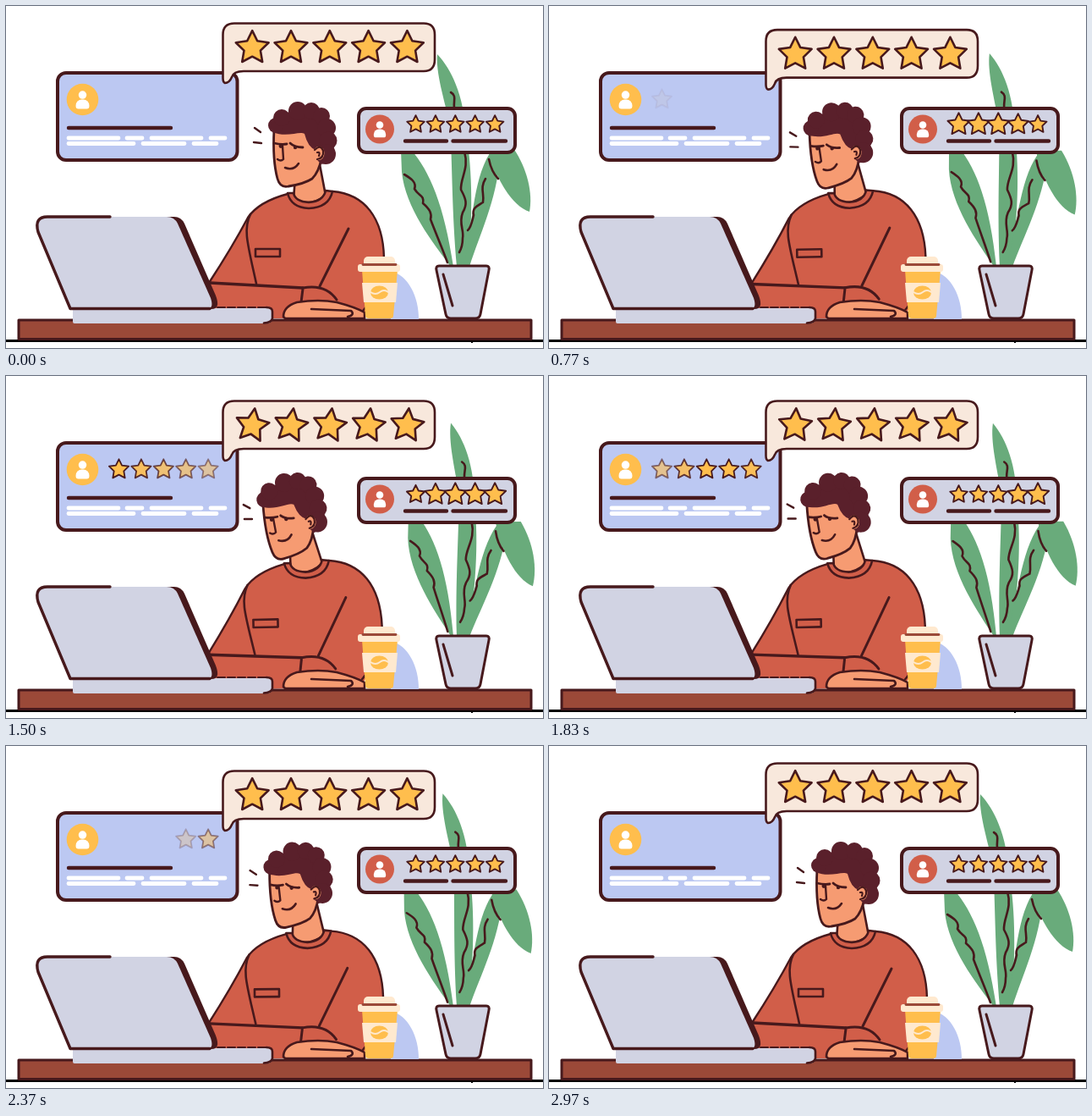
An HTML page with a canvas that plays this animation: 635x404 px, repeating every 3010 ms.

```html
<!DOCTYPE html>
<html lang="en">
<head>
<meta charset="utf-8">
<title>Customer reviews</title>
<style>
html, body { margin: 0; width: 100%; height: 100%; overflow: hidden; background: #fff; }
canvas { display: block; width: 635px; height: 404px; }
</style>
</head>
<body>
<canvas id="stage" width="635" height="404"></canvas>
<script>
const ctx = document.getElementById('stage').getContext('2d');
const LOOP = 3010;
const INK = '#47191c', RED = '#d15e49', SKIN = '#f69b72', HAIR = '#5a202b', GOLD = '#ffbe4d',
      CREAM = '#f8e8dc', MILK = '#ffe9cf', LILAC = '#bcc8f2', GREY = '#d1d3e3', GREEN = '#69ab7b', WOOD = '#9b4938';

const clamp = v => Math.max(0, Math.min(1, v));
const linear = (t, start, length) => clamp((t - start) / length);
const ease = (t, start, length) => (1 - Math.cos(Math.PI * linear(t, start, length))) / 2;

function shape(d, fill, stroke, width = 3) {
  const p = new Path2D(d);
  if (fill) { ctx.fillStyle = fill; ctx.fill(p); }
  if (stroke) { ctx.strokeStyle = stroke; ctx.lineWidth = width; ctx.stroke(p); }
}
const line = (d, width = 3, color = INK) => shape(d, null, color, width);

function box(x, y, w, h, r, fill, stroke, width) {
  const p = new Path2D();
  p.roundRect(x, y, w, h, r);
  shape(p, fill, stroke, width);
}

function dot(x, y, rx, fill, ry = rx) {
  ctx.fillStyle = fill;
  ctx.beginPath();
  ctx.ellipse(x, y, rx, ry, 0, 0, 7);
  ctx.fill();
}

function turned(x, y, angle, draw) {
  ctx.save();
  ctx.translate(x, y);
  ctx.rotate(angle);
  ctx.translate(-x, -y);
  draw();
  ctx.restore();
}

function star(x, y, r, width, angle = 0) {
  ctx.beginPath();
  for (let i = 0; i < 10; i++) {
    const a = angle - Math.PI / 2 + i * Math.PI / 5, q = i % 2 ? r * 0.5 : r;
    ctx.lineTo(x + q * Math.cos(a), y + q * Math.sin(a));
  }
  ctx.closePath();
  ctx.fillStyle = GOLD;
  ctx.fill();
  ctx.strokeStyle = INK;
  ctx.lineWidth = width;
  ctx.stroke();
}

function avatar(x, y, r, color) {
  dot(x, y, r, color);
  const k = r / 19;
  dot(x, y - 5.5 * k, 4.8 * k, '#fff');
  box(x - 8 * k, y, 16 * k, 11 * k, [7 * k, 7 * k, 3 * k, 3 * k], '#fff');
}

function plant() {
  shape('M533 308C527 240 528 190 525 140C518 110 508 78 510 57C527 75 541 105 544 150C552 195 552 255 546 308Z', GREEN);
  shape('M526 308C505 280 472 238 468 196L467 170L479 170C501 195 518 235 529 308Z', GREEN);
  shape('M541 308C552 262 551 208 572 174L584 180C580 230 560 270 548 308Z', GREEN);
  shape('M570 170C580 205 598 236 619 243C623 222 617 193 600 168Z', GREEN);
  line('M526 102C533 106 529 111 530 120', 2.6);
  line('M542 172C548 192 537 203 538 217C544 228 546 234 540 244C535 257 542 265 540 274Q540 284 536 291', 2.6);
  line('M471 199C478 203 486 208 483 216C488 225 495 223 493 233C501 240 504 245 502 252C508 268 515 284 522 303', 2.6);
  line('M567 204C560 215 566 222 564 232C556 237 551 239 553 247C551 255 550 262 546 265', 2.6);
  line('M571 181Q574 196 582 204', 2.6);
}

function pot() {
  shape('M512 307H568Q572 307 571 312L561 364Q560 369 555 369H526Q521 369 520 364L509 312Q508 307 512 307Z', GREY, INK);
  line('M517 317L528 354');
}

function head() {
  shape('M343 190L340 228Q359 238 378 224L370 182Z', SKIN, INK, 2.6);
  shape('M317 146Q315 182 321 204Q324 215 334 213Q353 210 362 204Q370 196 373 180L371 142Z', SKIN, INK, 2.8);
  shape('M315 149C333 156 347 147 353 151Q357 167 366 170L372 187Q388 184 388 170L386 142L370 124L346 120L324 130Z', HAIR);
  [[319, 141, 9], [326, 132, 10], [345, 124, 11], [361, 124, 10], [373, 130, 10],
   [379, 144, 11], [381, 159, 10.5], [378, 175, 12]].forEach(([x, y, r]) => dot(x, y, r, HAIR));
  dot(370, 174, 6.5, SKIN, 8);
  line('M365 170Q372 163 375 171Q376 180 368 181M368 173Q372 172 370 177', 2.2);
  line('M317 162Q325 164 332 163M336 162Q341 167 351 167', 2.8);
  line('M327 165L328 181Q325 184 321 181', 2.4);
  line('M330 191Q340 195 346 186', 2.6);
  dot(325, 165.5, 2.4, INK);
  dot(342, 167, 2.2, INK);
  line('M294 144L301 149M293 161L302 162', 2.4);
}

function torso() {
  shape('M333 222C307 229 294 238 286 250C269 282 255 304 240 327L248 369H420C436 345 447 325 447 298C446 250 424 222 386 219Q382 232 358 233Q340 232 338 222Z', RED);
  line('M333 222C307 229 294 238 286 250C269 282 255 304 240 327', 2.4);
  line('M386 219C424 222 446 250 447 298C447 325 436 345 422 360', 2.4);
  line('M289 246C280 264 286 282 296 328', 2.6);
  line('M405 263L371 331');
  box(295, 287, 29, 9, 0, null, INK, 2.6);
  line('M241 327L351 333', 3.4);
  line('M351 333Q378 328 391 347M351 334L349 350', 3);
}

function collar() {
  shape('M333 221Q337 238 358 239Q382 238 386 219L378 218Q375 231 358 232Q342 231 340 221Z', RED, INK, 2.6);
}

function hand() {
  shape('M328 367Q328 355 344 350Q370 346 391 350Q414 356 424 362V369H330Z', SKIN, INK, 2.6);
  line('M361 358L408 360Q413 365 404 367', 2.6);
}

function cup() {
  shape('M455 313C475 318 488 342 488 370H455Z', LILAC);
  shape('M421 312H463L458 366Q458 369 454 369H429Q425 369 425 366Z', GOLD);
  shape('M421 327H463L461 350H423Z', MILK);
  dot(441.5, 338.5, 10.5, GOLD, 8);
  line('M431 338Q437 342 442 338T452 338', 1.8, MILK);
  box(423, 296, 37, 11, [5, 5, 0, 0], MILK);
  box(416, 305, 50, 9, 3, MILK);
  line('M422 305.5H461', 2.8, WOOD);
}

function laptop() {
  box(79, 357, 236, 18, [0, 4, 6, 2], GREY);
  ctx.setLineDash([9, 3]);
  line('M250 356H310', 2);
  ctx.setLineDash([]);
  line('M308 356Q315 356 315 361V369Q314 374 305 374.5', 2.6);
  shape('M188 249H199Q207 249 211 257L248 342Q254 358 243 358H236Z', INK);
  shape('M76 357L38 267Q33 249 49 249H190Q199 249 203 257L242 345Q246 357 239 357Z', GREY);
  line('M123 249H49Q33 249 38 267L76 357.5H241', 3.4);
}

function desk() {
  ctx.fillStyle = '#000';
  ctx.fillRect(0, 394, 635, 3);
  ctx.fillRect(550, 397, 2, 1);
  box(15, 371, 606, 22.5, 0, WOOD, INK, 3);
}

function profileCard(t) {
  box(61, 79, 212.5, 103, 10, LILAC, INK, 4);
  avatar(90.5, 110.5, 18.8, GOLD);
  line('M74 144H195', 4.4);
  line('M74 156H133M143 156H161M172 156H231M242 156H259M74 162.5H151M162 162.5H211M222 162.5H249', 4.8, '#fff');
  for (let i = 0; i < 5; i++) {
    ctx.globalAlpha = linear(t, 730 + i * 100, 750) * (1 - linear(t, 1630 + i * 120, 500));
    if (ctx.globalAlpha > 0) star(133.5 + i * 26.4, 110.5, 12.2, 1.8);
  }
  ctx.globalAlpha = 1;
}

function bubble(t) {
  ctx.save();
  ctx.translate(0, 9 * (ease(t, 0, 1030) - ease(t, 2370, 600)));
  shape('M270 20.5H494Q507 20.5 507 34V63Q507 77 494 77H281Q269 77 267 84Q264 91 259 91Q256.5 90 256.5 85V34Q256.5 20.5 270 20.5Z', CREAM, INK, 2.6);
  for (let i = 0; i < 5; i++) {
    const tilt = 0.15 * Math.sin(Math.PI * linear(t, 1060 + i * 60, 870));
    star(291.2 + i * 45.8, 49.5, 20.4, 2.6, tilt);
  }
  ctx.restore();
}

function ratingCard(t) {
  box(417, 121, 185, 52, 9, GREY, INK, 4);
  avatar(442, 145.5, 17, RED);
  line('M472 159.5H521M528.5 159.5H591', 4.4);
  for (let i = 0; i < 5; i++) {
    const grow = ease(t, 130 + i * 150, 300) - ease(t, 1270 + i * 150, 300);
    star(484.5 + i * 23.4, 140, 10.8 * (1 + 0.27 * grow), 1.9);
  }
}

function draw(t) {
  ctx.fillStyle = '#fff';
  ctx.fillRect(0, 0, 635, 404);
  ctx.lineCap = ctx.lineJoin = 'round';
  const lean = ease(t, 0, 1250) - ease(t, 1600, 1370);

  turned(540, 307, 0.064 * lean, plant);
  pot();
  turned(340, 400, -0.023 * lean, () => {
    torso();
    turned(358, 222, -0.1 * lean, head);
    collar();
  });
  desk();
  hand();
  cup();
  laptop();
  profileCard(t);
  bubble(t);
  ratingCard(t);
}

const begin = performance.now();
function tick() {
  draw((performance.now() - begin) % LOOP);
  requestAnimationFrame(tick);
}
tick();
</script>
</body>
</html>
```
